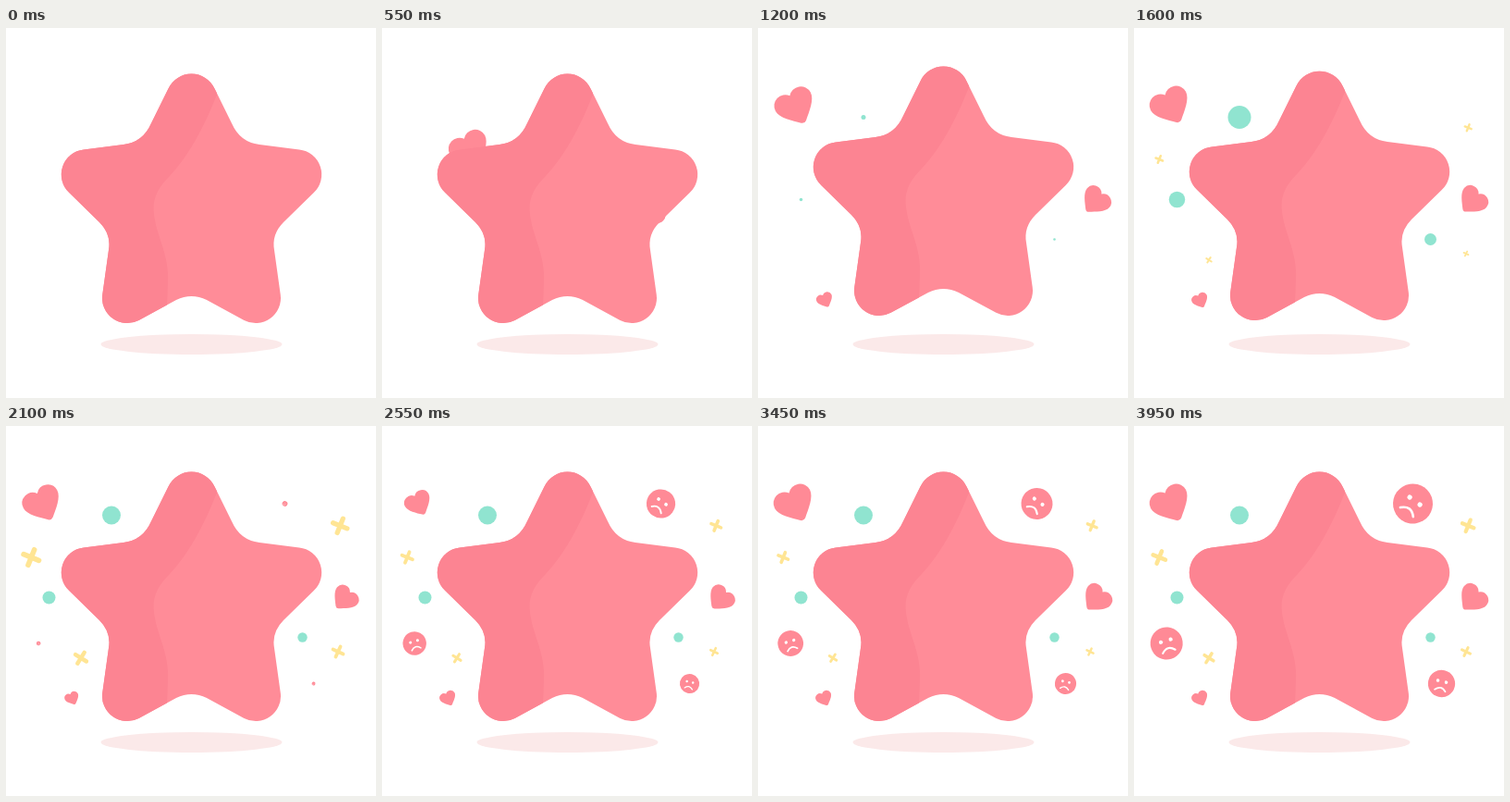
An HTML page for the animation above (5 s loop, 400 px wide and 400 px high).

```html
<!DOCTYPE html>
<html lang="en">
<head>
<meta charset="utf-8">
<title>Star burst</title>
<style>
  html, body { margin: 0; width: 100%; height: 100%; overflow: hidden; background: #fff; }
  svg { display: block; width: 100%; height: 100%; }
</style>
</head>
<body>
<svg viewBox="0 0 400 400">
  <defs>
    <path id="heart" fill="#ff8a96" d="M0-11.3A12 12 0 0 1 21.5-4C21.5 5 10 14 3 20.5Q0 23-3 20.5C-10 14-21.5 5-21.5-4A12 12 0 0 1 0-11.3Z"/>
    <circle id="dot" r="10" fill="#90e4d0"/>
    <path id="cross" d="M-7.2 0H7.2M0-7.2V7.2" stroke="#ffe594" stroke-width="4.6" stroke-linecap="round"/>
    <g id="face">
      <circle r="21.5" fill="#ff8a96"/>
      <g fill="#fff"><circle cx="-6.8" cy="-3.6" r="2.6"/><circle cx="6.8" cy="-3.6" r="2.6"/></g>
      <path d="M-8.6 11.3Q0 2 8.6 11.3" fill="none" stroke="#fff" stroke-width="2.6" stroke-linecap="round"/>
    </g>
    <path id="body" d="M175.5 65.5A27.6 27.6 0 0 1 225.5 65.5L244 103Q253 123.5 274 126L317 131.5A27 27 0 0 1 332.7 178L300 210Q287 223 290 240L296.7 288A27 27 0 0 1 257.4 315.9L217 294Q200.5 286 184 294L143.6 315.9A27 27 0 0 1 104.3 288L111 240Q114 223 101 210L68.3 178A27 27 0 0 1 84 131.5L127 126Q148 123.5 157 103Z"/>
    <clipPath id="clip"><use href="#body"/></clipPath>
  </defs>
  <rect width="400" height="400" fill="#fff"/>
  <ellipse cx="200.5" cy="342" rx="98" ry="11" fill="#fbe9e9"/>
  <g id="parts"></g>
  <g id="star">
    <use href="#body" fill="#ff8c98"/>
    <path clip-path="url(#clip)" fill="#fc8492" d="M232 40L228 72C217 100 200 136 177 160C163 174 158 186 160 201C162 224 177 245 175 275L173 330H40V40Z"/>
  </g>
</svg>
<script>
const LOOP = 5000, STEP = 50;
const star = document.getElementById('star');
const layer = document.getElementById('parts');

const clamp = v => Math.min(1, Math.max(0, v));
const linear = p => p;
const inOut = p => p < .5 ? 2 * p * p : 1 - 2 * (1 - p) ** 2;

// keys: [time, value] pairs in order of time
function track(keys, t, ease = linear) {
  let value = keys[0][1];
  for (let i = 1; i < keys.length; i++) {
    const [t0, v0] = keys[i - 1], [t1, v1] = keys[i];
    if (t >= t0) value = v0 + (v1 - v0) * ease(clamp((t - t0) / (t1 - t0)));
  }
  return value;
}

const lift = [[950, 0], [1400, -13.3], [1700, 0]];
const pops = {
  dot: [[1100, 0], [1600, 1.25], [1900, 1]],
  cross: [[1400, 0], [1900, 1.4], [2650, .76], [3430, .76], [3600, 1]],
  face: [[2000, 0], [2600, .79], [3450, .79], [3950, 1]]
};

// x, y, size, tilt; hearts also have a flight offset and their own pulse
const parts = [
  { kind: 'heart', x: 38.9, y: 82.5, size: 1, tilt: -28, from: [90, 77],
    pulse: [[2050, 1], [2500, .66], [2600, .68], [3000, 1]] },
  { kind: 'heart', x: 367, y: 185.7, size: .74, tilt: 41, from: [-125, 23],
    pulse: [[2000, 1], [2300, .7], [2650, 1]] },
  { kind: 'heart', x: 71.3, y: 293.8, size: .41, tilt: -25, from: [89, -56],
    pulse: [[2000, 1], [2250, .7], [2500, 1]] },
  { kind: 'dot', x: 114, y: 96.5, size: 1, tilt: 0 },
  { kind: 'dot', x: 46.5, y: 185.5, size: .7, tilt: 0 },
  { kind: 'dot', x: 320.5, y: 228.5, size: .52, tilt: 0 },
  { kind: 'cross', x: 27.3, y: 142, size: 1, tilt: 22 },
  { kind: 'cross', x: 361.2, y: 107.8, size: .93, tilt: 22 },
  { kind: 'cross', x: 81, y: 250.8, size: .79, tilt: 32 },
  { kind: 'cross', x: 359, y: 244, size: .68, tilt: 25 },
  { kind: 'face', x: 301.5, y: 84, size: 1, tilt: 36 },
  { kind: 'face', x: 35.2, y: 235, size: .815, tilt: -17 },
  { kind: 'face', x: 332.5, y: 278.5, size: .68, tilt: 13 }
];

for (const part of parts) {
  part.el = document.createElementNS('http://www.w3.org/2000/svg', 'use');
  part.el.setAttribute('href', '#' + part.kind);
  layer.append(part.el);
}

function draw(t) {
  star.setAttribute('transform', `translate(0 ${track(lift, t, inOut)})`);
  const away = (1 - clamp((t - 300) / 950)) ** 1.6;
  for (const { kind, x, y, size, tilt, from = [0, 0], pulse, el } of parts) {
    const scale = size * track(pulse || pops[kind], t);
    el.setAttribute('transform',
      `translate(${x + from[0] * away} ${y + from[1] * away}) rotate(${tilt}) scale(${scale})`);
    el.setAttribute('visibility', scale > 0 ? 'visible' : 'hidden');
  }
}

const start = performance.now();
function tick() {
  const t = (performance.now() - start) % LOOP;
  draw(Math.floor(t / STEP) * STEP);
  requestAnimationFrame(tick);
}
tick();
</script>
</body>
</html>
```
